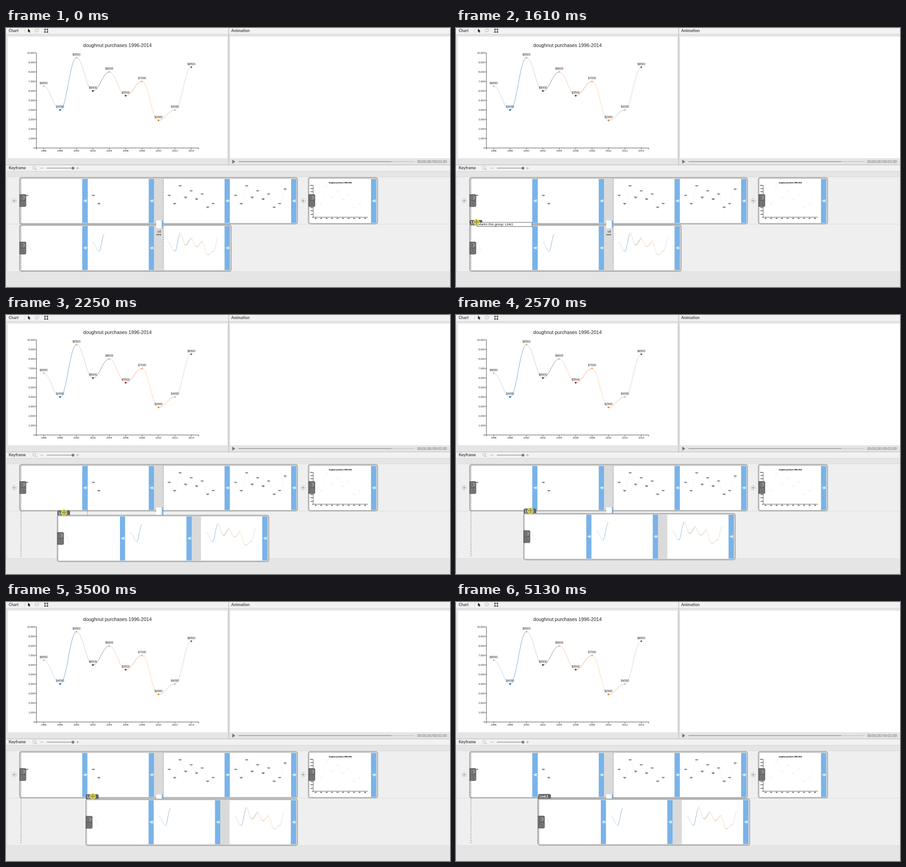
An HTML page that plays this animation: 978 px wide and 572 px high, repeating every 8 s.

```html
<!DOCTYPE html>
<html lang="en">
<head>
<meta charset="utf-8">
<title>Keyframe editor</title>
<style>
  html, body { margin: 0; width: 100%; height: 100%; overflow: hidden; background: #e6e6e6; }
  svg { display: block; width: 978px; height: 572px; }
  text { font-family: "Liberation Sans", Arial, sans-serif; }
  .lato { font-family: Lato, sans-serif; }
  .head { font: 700 8.8px Lato, sans-serif; fill: #4a4a4a; }
</style>
</head>
<body>
<svg id="stage" viewBox="0 0 978 572" xmlns="http://www.w3.org/2000/svg"></svg>
<script>
const LOOP = 8000;
const BLUE = '#78b3ea';
const values = [6500, 4000, 9500, 6000, 8000, 5500, 7000, 2900, 4000, 8500];
const dotColors = ['#a9cbe8', '#1f6cb0', '#c6c68c', '#2f4a2c', '#f4b78c',
  '#b3201a', '#f2b680', '#de8a2c', '#c3c3c6', '#6c5f94'];
const lineColors = ['#b9d6ec', '#6ea6d8', '#cfd0b4', '#8b9385', '#f7c9a8',
  '#f0a27e', '#f7d6a6', '#f2b48c', '#d6d6da'];

const px = i => 83 + i * 36.13;
const py = v => 265 - v * 0.021;
const range = n => [...Array(n).keys()];
const each = (n, fn) => range(n).map(fn).join('');

const rect = (x, y, w, h, fill, extra = '') =>
  `<rect x="${x}" y="${y}" width="${w}" height="${h}" fill="${fill}" ${extra}/>`;
const path = (d, stroke, w = 1, extra = '') =>
  `<path d="${d}" fill="none" stroke="${stroke}" stroke-width="${w}" ${extra}/>`;
const circle = (x, y, r, fill, extra = '') =>
  `<circle cx="${x}" cy="${y}" r="${r}" fill="${fill}" ${extra}/>`;
const text = (x, y, size, str, extra = '') =>
  `<text x="${x}" y="${y}" font-size="${size}" ${extra}>${str}</text>`;
const group = (id, body, extra = '') => `<g id="${id}" ${extra}>${body}</g>`;
const at = (x, y, body) => `<g transform="translate(${x} ${y})">${body}</g>`;

// ---- chart pieces ----
function curve(i) {
  const x0 = px(i), x1 = px(i + 1), y0 = py(values[i]), y1 = py(values[i + 1]);
  const k = (x1 - x0) * 0.4;
  return `M${x0} ${y0}C${x0 + k} ${y0} ${x1 - k} ${y1} ${x1} ${y1}`;
}
const lines = (n, w, color) => each(n, i => path(curve(i), color || lineColors[i], w));
const dots = (n, r, color) => each(n, i => circle(px(i), py(values[i]), r, color || dotColors[i]));
const labels = (n, extra = '') => each(n, i =>
  text(px(i), py(values[i]) - 5, 6.3, '$' + values[i], `text-anchor="middle" ${extra}`));

function axes(w, extra = '') {
  const y = each(11, i => text(63.5, 267 - i * 21, 5.6, (i * 1000).toLocaleString('en-US'),
    `text-anchor="end" ${extra}`));
  const x = each(10, i => text(px(i), 273.4, 5.6, 1996 + i * 2, `text-anchor="middle" ${extra}`));
  const ticks = each(11, i => `M64 ${55 + i * 21}H67`) + each(10, i => `M${px(i)} 265V267.8`);
  return path('M67 55V267.8M67 265H424.5V267.8' + ticks, '#333', w) + y + x;
}
const title = (extra = '') =>
  text(245.5, 42, 10.7, 'doughnut purchases 1996-2014', `text-anchor="middle" ${extra}`);

// ---- timeline pieces ----
const arrow = path('M-3.5 0H2M-.6 -2.9L2.3 0L-.6 2.9M3.6 -3.4V3.4', '#fff', 1.2);
const mini = (x, y, body) =>
  `<g transform="translate(${x - 14.8} ${y - 4.4}) scale(.335)">${body}</g>`;

// White card with its blue end bar; y is the card's top.
const card = (x, y, body = '') =>
  rect(x, y, 135, 97, '#fff') + mini(x, y, body) +
  rect(x + 135, y, 11.5, 97, BLUE) + at(x + 140.7, y + 48.2, arrow);

const frame = (x, y, w) => rect(x, y, w, 102, '#dadada', 'rx="4" stroke="#a6a6a6" stroke-width="1.8"');

const grip = (x, y) => at(x, y,
  `<path d="M0 0H11.5Q15 0 15 3.5V24.5Q15 28 11.5 28H0Z" fill="#696969"/>` +
  circle(8.3, 7.6, 4.1, '#8c8c8c', 'stroke="#aaa" stroke-width=".8"') +
  `<path d="M8.3 3.5A4.1 4.1 0 0 0 8.3 11.7Z" fill="#6f6f6f"/>` +
  path('M4.8 17.3H12V24.5H4.8ZM6.5 22.8L10.6 18.8', '#8f8f8f', .9));

const plus = (x, y) => at(x, y,
  circle(0, 0, 4.9, 'none', 'stroke="#999" stroke-width=".8" stroke-dasharray="1.6 1"') +
  path('M-3 0H3M0 -3V3', '#888', 1));

const bold = 'stroke="#111" stroke-width=".9"';
const pointSet = n => dots(n, 2.6) + labels(n, bold);
const lineSet = n => lines(n, 2.5) + labels(n, 'fill="#aaa"');
const faintLine = n => `<g opacity=".28">${lines(n, 1.6, '#bbb')}</g>`;

const dash = (x, y0, y1, id = '') =>
  path(`M${x} ${y0}V${y1}`, '#777', .9, `stroke-dasharray="3 1.8" ${id}`);
const fold = rect(331, 425, 12, 17, '#fff') + rect(343, 425, 2.5, 17, BLUE);

function hoverBar(id, x) {
  const body = rect(x, 522, 146.5, 12.5, 'rgba(196,196,196,.72)') +
    each(8, i => rect(x + 59.5 + (i % 4) * 3.4, 525.5 + (i > 3 ? 3.6 : 0), 1.7, 1.7, '#666'));
  return `<g clip-path="url(#cardClip)">${group(id, body)}</g>`;
}
const preview = (id, x) => group(id,
  rect(x, 437.5, 134.5, 97, 'rgba(238,238,238,.8)') +
  text(x + 69.5, 486, 8.7, 'Click to preview from here', 'text-anchor="middle" font-weight="700" fill="#a2a2a2"'));

// ---- static layers ----
const header =
  rect(0, 0, 978, 14, '#f2f2f2') + rect(0, 13.5, 978, 1, '#d2d2d2') +
  rect(4, 19, 483.5, 268.5, '#fff') + rect(493.5, 19, 484.5, 268.5, '#fff') +
  rect(489.8, 0, 1.4, 302, '#bdbdbd') +
  text(6, 9.2, 8.8, 'Chart', 'class="head"') + text(496, 9.2, 8.8, 'Animation', 'class="head"') +
  rect(40.5, 1.5, .9, 9, '#ccc') +
  `<path d="M48.5 1.5L54.2 7.2H51.7L53 10L51.6 10.6L50.4 7.8L48.5 9.5Z" fill="#111"/>` +
  path('M66 8C62 6 64.5 2.5 68.5 2.5S73.5 6 70 7.5S66.5 7 66.5 8.5S66 10 65.5 10.5', '#aaa', 1) +
  path('M85.8 3H91.5V9H85.8Z', '#333', 1) +
  each(4, i => rect(i % 2 ? 90.3 : 84.4, i > 1 ? 7.8 : 1.7, 2.5, 2.5, '#333'));

const player =
  `<path d="M498.3 290.8L505.2 295.2L498.3 299.6Z" fill="#777"/>` +
  rect(512, 294.4, 388, 1.4, '#c6c6c6') + rect(512, 294.4, 337, 1.4, '#9a9a9a') +
  text(971, 298.4, 7.8, '00:00.00/00:03.00', 'class="lato" text-anchor="end" fill="#666"');

const tools =
  rect(0, 301.8, 978, 1.2, '#bdbdbd') + rect(0, 303, 978, 13.5, '#f2f2f2') + rect(0, 316, 978, 1, '#d4d4d4') +
  text(6, 312.4, 8.8, 'Keyframe', 'class="head"') +
  circle(62.3, 308.6, 3.3, 'none', 'stroke="#b5b5b5"') + path('M64.7 311L67.7 314', '#b5b5b5', 1.2) +
  path('M75.5 309.5H82M154.3 309.5H161M157.6 306.2V312.8', '#aaa', 1) +
  rect(90, 308.7, 58, 1.5, '#9a9a9a') + circle(147.5, 309.5, 3.1, '#7a7a7a');

const rows = rect(3, 329, 975, 209, '#efefef') +
  path('M0 328.7H978M0 433.2H978M0 538H978', '#d9d9d9', 1);

const upper =
  frame(30, 330.5, 612) + plus(18, 381.5) + plus(654.5, 381.5) +
  card(33, 333.5, pointSet(1)) + card(179.5, 333.5, pointSet(2)) +
  card(346.5, 333.5, faintLine(8) + pointSet(9)) + card(493, 333.5, faintLine(9) + pointSet(10)) +
  grip(29.5, 367) +
  frame(666, 330.5, 152.5) +
  card(669, 333.5, `<g opacity=".45">${lines(9, 1.2, '#ddd')}${dots(9, 2.2, '#bbb')}${labels(9, 'fill="#888"')}</g>` +
    axes(2.4, bold) + title('stroke="#111" stroke-width=".6"')) +
  grip(666, 367);

const tab = group('tab',
  `<path d="M30 436V427.5Q30 424 33.5 424H54.5Q58 424 58 427.5V436Z" fill="#626262"/>` +
  text(33, 432.3, 8, 'Link1', 'class="lato" font-weight="700" fill="#fff"'));

const lower = group('lower', tab + frame(30, 435, 466) +
  card(33, 437.5, `<g opacity=".8">${lines(1, 2)}</g>` + labels(1, 'fill="#bbb"')) +
  card(179.5, 437.5, lines(2, 2.5) + labels(1, 'fill="#aaa"')) +
  card(346.5, 437.5, lineSet(9)) + grip(29.5, 472));

const marks = dash(33, 333, 534) + dash(179.7, 333, 534, 'id="mid"') + dash(346.5, 333, 534) + fold;

const pins = group('pins',
  dash(33, 437, 534) + dash(179.7, 437, 534) + dash(346.5, 437, 534) + fold +
  text(333.8, 452.3, 7.4, 'x6', 'class="lato" fill="#333"') +
  each(3, i => circle(332.7 + i * 3.7, 456.6, 1.25, '#333')));

const tip = group('tip',
  rect(47.3, 429.2, 120, 9.2, '#fff', 'stroke="#444" stroke-width=".9"') +
  text(49, 436.3, 7.45, 'Marks this group: Link1', 'fill="#222"'));

const crossD = 'M-5 0H5M0 -5V5M-3.3 -1.7L-5 0L-3.3 1.7M3.3 -1.7L5 0L3.3 1.7' +
  'M-1.7 -3.3L0 -5L1.7 -3.3M-1.7 3.3L0 5L1.7 3.3';
const cursor = group('cursor',
  group('point', '<path d="M0 0V11L2.6 8.6L4.4 12.5L6.2 11.7L4.5 7.9H8Z" fill="#fff" stroke="#222" stroke-width=".8"/>') +
  group('hand', '<path d="M-2.2 -5Q-1.3 -6.2 -.4 -5V-1L3.5 -.3Q5 .1 4.8 1.8L4.2 4.5L3.5 6.5H-1.3L-4.3 2.2Q-4.6 .7 -3.3 1L-2.2 2Z" fill="#fff" stroke="#444" stroke-width=".9"/>') +
  group('move', circle(0, 0, 6.8, '#e8e02c', 'id="glow" opacity=".9"') +
    path(crossD, '#fff', 2.2, 'opacity=".5"') + path(crossD, '#5a5a20', 1)));

document.getElementById('stage').innerHTML =
  '<defs><clipPath id="cardClip"><rect x="28" y="437" width="300" height="98"/></clipPath></defs>' +
  rect(0, 0, 978, 572, '#e5e5e5') + header +
  axes(.9, 'fill="#222"') + lines(9, 1) + dots(10, 2) + labels(10, 'fill="#222"') + title('fill="#222"') +
  player + tools + rows + upper + marks + lower +
  preview('previewA', 33) + preview('previewB', 179.5) + hoverBar('barA', 33) + hoverBar('barB', 179.5) +
  pins + tip + cursor;

// ---- motion ----
// Bursts of movement: start, end, number of steps.
const bursts = [[200, 360, 3], [520, 1310, 11], [1790, 2570, 11], [2660, 3340, 10],
  [3500, 3740, 4], [3880, 4120, 4], [4580, 4810, 4], [4950, 5130, 4]];
// Pointer: time, x, y.
const track = [
  [200, 398, 558], [360, 300, 522], [520, 255, 510], [678, 89, 491], [836, 66, 470],
  [1000, 54, 446], [1150, 47, 431], [1310, 45, 428.5],
  [1790, 50, 430], [1970, 78, 435], [2258, 128, 436], [2570, 164, 432],
  [2660, 168, 431], [2960, 182.5, 430], [3340, 190, 429], [3500, 191, 429],
  [3740, 194, 429], [3880, 194.5, 429], [4120, 196, 428.5],
  [4580, 206, 436], [4810, 260, 481], [4950, 280, 500], [5130, 400, 585]];
const HOME = { x: 45, y: 428.5 };

function snap(t) {
  let held = 0;
  for (const [a, b, n] of bursts) {
    if (t < a) break;
    const gap = (b - a) / (n - 1);
    held = a + gap * Math.min(n - 1, Math.floor((t - a) / gap + 0.2));
  }
  return held;
}

function pointer(t) {
  const i = track.findIndex(k => k[0] >= t);
  if (i < 0) return { x: 400, y: 585 };
  const b = track[i], a = track[Math.max(0, i - 1)];
  const f = b[0] === a[0] ? 0 : (t - a[0]) / (b[0] - a[0]);
  return { x: a[1] + (b[1] - a[1]) * f, y: a[2] + (b[2] - a[2]) * f };
}

const el = id => document.getElementById(id);
const show = (id, on) => { el(id).style.display = on ? '' : 'none'; };
const move = (id, x, y) => el(id).setAttribute('transform', `translate(${x} ${y})`);
const between = (t, a, b) => t >= a && t < b;
const ease = (t, a, b, from) => from * (1 - Math.min(1, Math.max(0, (t - a) / (b - a))));

function draw(t) {
  const s = snap(t), p = pointer(s);
  const moved = t >= 1790;

  show('cursor', between(t, 200, 5130));
  move('cursor', p.x, p.y);
  show('point', t < 520);
  show('hand', between(t, 520, 1070));
  show('move', t >= 1070);
  show('glow', between(t, 1610, 4430));

  if (!moved) move('lower', 0, 0);
  else if (t < 4120) move('lower', p.x - HOME.x, p.y - HOME.y);
  else move('lower', 151, 0);

  show('tab', t >= 590);
  move('tab', 0, ease(s, 590, 757, 6.5));
  show('pins', !moved);
  show('mid', !between(t, 2480, 3960));
  show('tip', between(t, 1390, 1790));

  show('barB', between(t, 200, 757));
  move('barB', 0, ease(s, 120, 360, 12));
  show('previewB', between(t, 520, 757));
  show('barA', between(t, 662, 1070));
  move('barA', 0, ease(s, 660, 836, 12));
  show('previewA', between(t, 820, 1070));
}

const start = performance.now();
function tick() {
  draw((performance.now() - start) % LOOP);
  requestAnimationFrame(tick);
}
tick();
</script>
</body>
</html>
```
